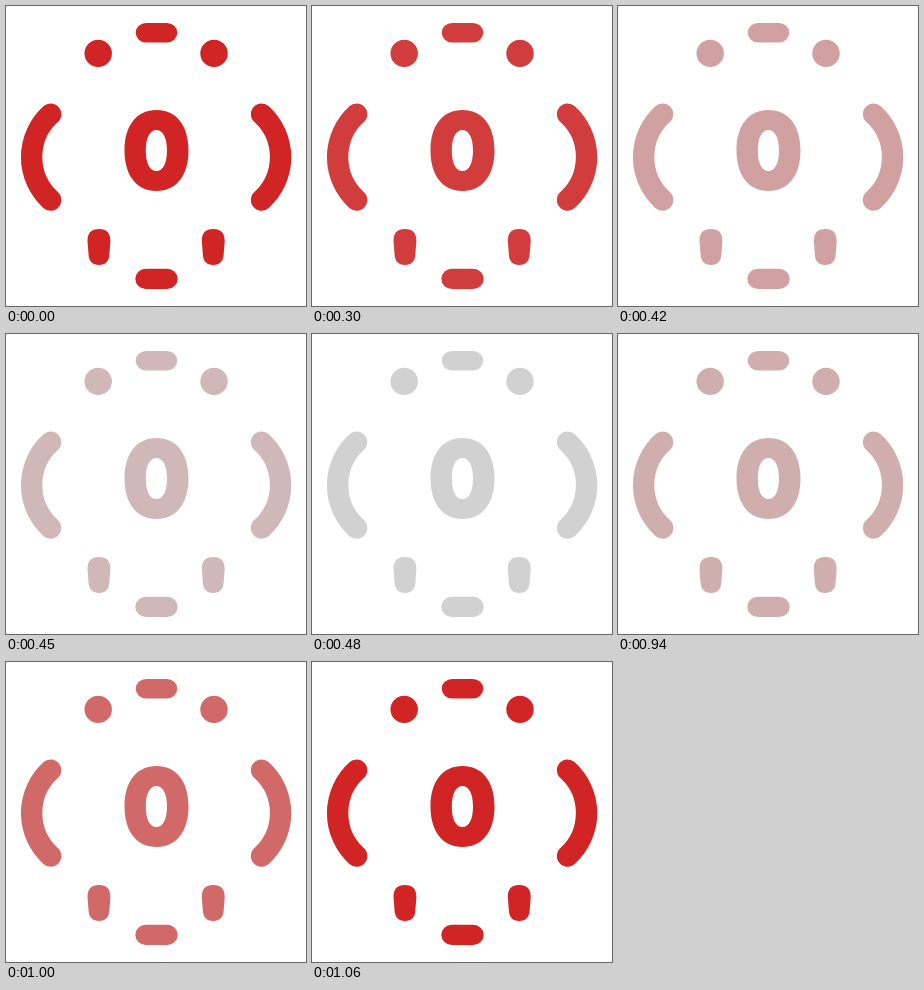
An HTML page for the animation above (1.29 s loop, 300 by 300 pixels).

```html
<!DOCTYPE html>
<html lang="en">
<head>
<meta charset="utf-8">
<title>Blinking zero</title>
<style>
  html, body { margin: 0; width: 100%; height: 100%; overflow: hidden; background: #fff; }
  svg { display: block; width: 100%; height: 100%; color: #d12424; animation: fade 1290ms infinite; }
  .arc { fill: none; stroke: currentColor; stroke-width: 21.4; stroke-linecap: round; }

  /* 30 ms colour steps: seven to grey, five back to red */
  @keyframes fade {
    0% { color: #d12424; animation-timing-function: linear; }
    23.255% { color: #d12424; animation-timing-function: steps(7, start); }
    39.534% { color: #d1d1d1; animation-timing-function: linear; }
    72.868% { color: #d1d1d1; animation-timing-function: steps(5, start); }
    84.496%, 100% { color: #d12424; animation-timing-function: linear; }
  }
</style>
</head>
<body>
<svg viewBox="0 0 300 300" fill="currentColor">
  <defs>
    <g id="side">
      <circle cx="92.2" cy="47.4" r="13.7"/>
      <path class="arc" d="M44.6 108.2A58 58 0 0 0 44.6 194"/>
      <path d="M81.5 235C81.5 227 85 223 93 223S104.4 227 104.4 235L103.4 248C103 255.500 99.500 259 93 259S83 255.500 82.500 248Z"/>
    </g>
  </defs>
  <use href="#side"/>
  <use href="#side" transform="matrix(-1 0 0 1 300.200 0)"/>
  <rect x="129.700" y="17" width="41.600" height="19.500" rx="10.500" ry="9.750"/>
  <rect x="129.300" y="262.700" width="42.400" height="20.300" rx="10.500" ry="10.150"/>
  <path fill-rule="evenodd" d="M150.500 104C170 104 182.500 119 182.500 144.500S170 185 150.500 185S118.500 170 118.500 144.500S131 104 150.500 104Z
    M150.400 124C144 124 139.800 131.500 139.800 144.500S144 165 150.400 165S161 157.500 161 144.500S156.800 124 150.400 124Z"/>
</svg>
</body>
</html>
```
